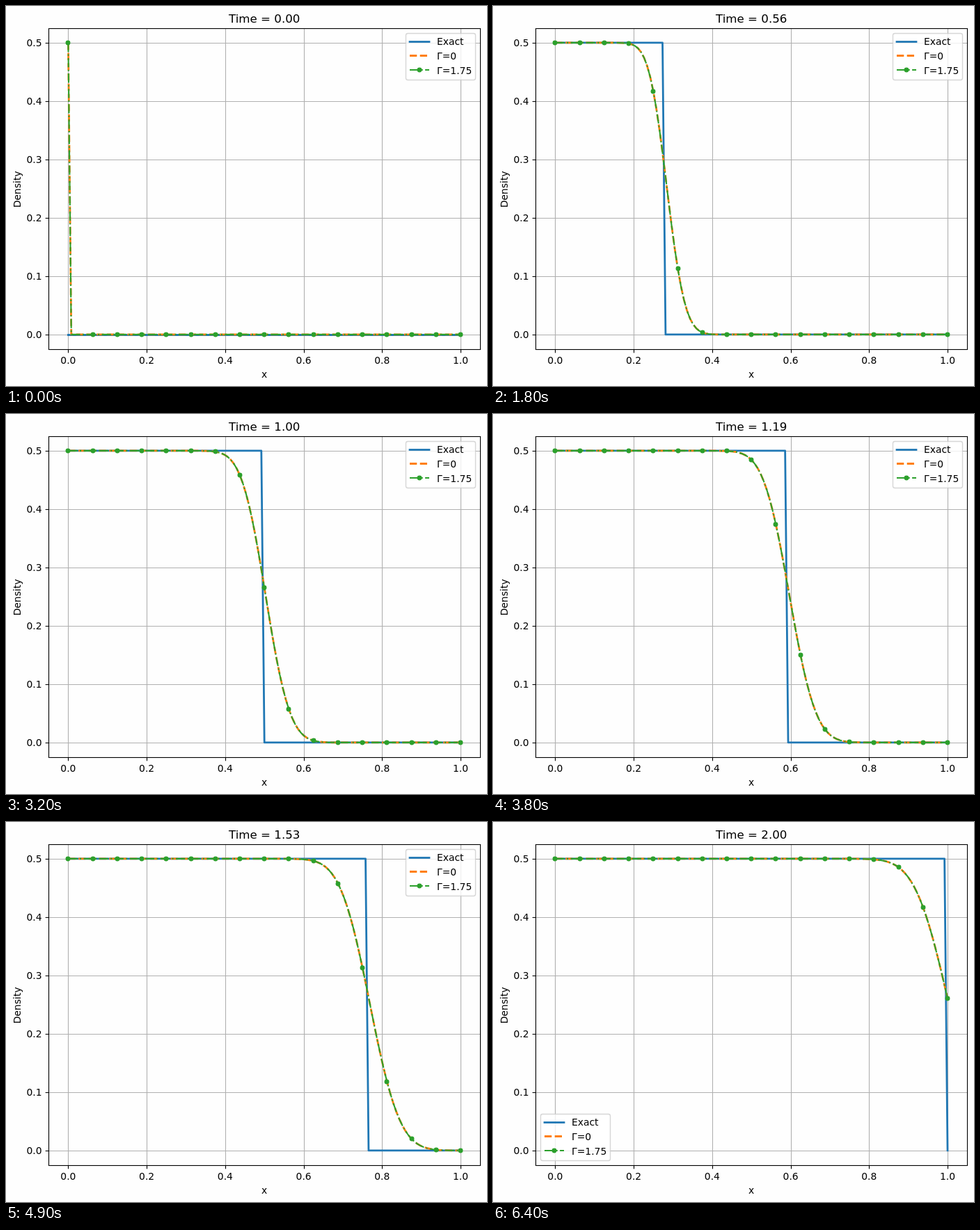
Write an HTML page with a canvas that moves like this. It is 691 by 547 pixels and loops after 6.5 s.

```html
<!DOCTYPE html>
<html lang="en">
<head>
<meta charset="utf-8">
<title>Density front</title>
<style>
html, body { margin: 0; width: 100%; height: 100%; overflow: hidden; background: #fefefe; }
canvas { display: block; width: 691px; height: 547px; }
</style>
</head>
<body>
<canvas id="stage"></canvas>
<script>
const W = 691, H = 547;
const canvas = document.getElementById('stage');
const ctx = canvas.getContext('2d');
const ratio = window.devicePixelRatio || 1;
canvas.width = Math.round(W * ratio);
canvas.height = Math.round(H * ratio);
ctx.scale(ratio, ratio);

const STEP_MS = 100, FRAMES = 65;
const CELLS = 128, COURANT = 0.4, STEPS = 5, LEVEL = 0.5;
const PT = 100 / 72;
const BOX = { l: 61.5, r: 681.5, t: 32.5, b: 494.5 };
const MID_X = 371.2, MID_Y = 263;
const BLUE = '#1f77b4', ORANGE = '#ff7f0e', GREEN = '#2ca02c';
const DASH = [3.7, 1.6].map(v => v * 2 * PT);
const DASH_DOT = [6.4, 1.6, 1, 1.6].map(v => v * 1.5 * PT);

const px = x => 89.4 + x * 620 / 1.1;
const py = y => 472.9 - y * 840;
const snap = v => Math.floor(v + 0.5);

// First-order upwind advection with a fixed inflow value.
function solve() {
  const u = new Float64Array(CELLS + 1);
  u[0] = LEVEL;
  const states = [u.slice()];
  while (states.length < FRAMES) {
    for (let s = 0; s < STEPS; s++) {
      for (let j = CELLS; j > 0; j--) u[j] -= COURANT * (u[j] - u[j - 1]);
    }
    states.push(u.slice());
  }
  return states;
}
const states = solve();

function stroke(points, color, width, dash = []) {
  ctx.beginPath();
  points.forEach(([x, y]) => ctx.lineTo(x, y));
  ctx.strokeStyle = color;
  ctx.lineWidth = width;
  ctx.lineJoin = 'round';
  ctx.lineCap = dash.length ? 'butt' : 'square';
  ctx.setLineDash(dash);
  ctx.stroke();
  ctx.setLineDash([]);
}

const solid = p => stroke(p, BLUE, 2 * PT);
const dashed = p => stroke(p, ORANGE, 2 * PT, DASH);
const dotted = p => stroke(p, GREEN, 1.5 * PT, DASH_DOT);

function marker(x, y) {
  ctx.beginPath();
  ctx.arc(snap(x), snap(y), 2.5 * PT, 0, 2 * Math.PI);
  ctx.fillStyle = GREEN;
  ctx.fill();
}

function text(str, x, y, align = 'center', size = 10) {
  ctx.font = `${size * PT}px "DejaVu Sans", sans-serif`;
  ctx.textAlign = align;
  ctx.textBaseline = 'alphabetic';
  ctx.fillStyle = '#000';
  ctx.fillText(str, x, y);
}

function axes() {
  const thin = 0.8 * PT;
  ctx.lineWidth = thin;
  for (let i = 0; i <= 5; i++) {
    const x = snap(px(i / 5)) + 0.5, y = snap(py(i / 10)) + 0.5;
    for (const [color, line] of [
      ['#b0b0b0', [x, BOX.t, x, BOX.b]],
      ['#b0b0b0', [BOX.l, y, BOX.r, y]],
      ['#000', [x, BOX.b, x, BOX.b + 4.86]],
      ['#000', [BOX.l, y, BOX.l - 4.86, y]]
    ]) {
      ctx.beginPath();
      ctx.moveTo(line[0], line[1]);
      ctx.lineTo(line[2], line[3]);
      ctx.strokeStyle = color;
      ctx.stroke();
    }
    text((i / 5).toFixed(1), px(i / 5), 515);
    text((i / 10).toFixed(1), 51.5, y + 4.5, 'right');
  }
  text('x', MID_X, 535);
  ctx.save();
  ctx.translate(21, MID_Y + 1);
  ctx.rotate(-Math.PI / 2);
  text('Density', 0, 0);
  ctx.restore();
}

function curves(k) {
  const u = states[k], exact = [], curve = [];
  const flat = k === 0;
  for (let j = 0; j <= CELLS; j++) {
    const x = px(j / CELLS);
    const y = py(j < 2 * k ? LEVEL : 0);
    exact.push([x, flat ? snap(y) + 0.5 : y]);
    curve.push([x, py(u[j])]);
  }
  solid(exact);
  dashed(curve);
  dotted(curve);
  for (let j = 0; j <= CELLS; j += 8) marker(...curve[j]);
}

function legend(x, y) {
  ctx.save();
  ctx.translate(x, y);
  ctx.beginPath();
  ctx.roundRect(0.5, 0.5, 100, 67, 2.78);
  ctx.fillStyle = 'rgba(255,255,255,0.8)';
  ctx.fill();
  ctx.strokeStyle = 'rgba(204,204,204,0.8)';
  ctx.lineWidth = PT;
  ctx.stroke();
  const row = v => [[6, v], [34, v]];
  solid(row(12.5));
  dashed(row(32.5));
  dotted(row(53));
  marker(20, 53);
  ['Exact', 'Γ=0', 'Γ=1.75'].forEach((label, i) => text(label, 45, 17 + 21 * i, 'left'));
  ctx.restore();
}

// Two decimals, ties going to the even digit.
function clock(k) {
  const t = k / 32;
  return (k % 16 === 4 ? t - 1e-6 : t).toFixed(2);
}

function draw(k) {
  ctx.fillStyle = '#fefefe';
  ctx.fillRect(0, 0, W, H);
  axes();
  curves(k);
  ctx.strokeStyle = '#000';
  ctx.lineWidth = 0.8 * PT;
  ctx.lineJoin = 'miter';
  ctx.strokeRect(BOX.l, BOX.t, BOX.r - BOX.l, BOX.b - BOX.t);
  text('Time = ' + clock(k), MID_X, 24, 'center', 12);
  if (k < 56) legend(574, 39);
  else legend(68, 420);
}

const start = performance.now();
let shown = -1;
function tick() {
  const k = Math.floor((performance.now() - start) / STEP_MS) % FRAMES;
  if (k !== shown) draw(shown = k);
  requestAnimationFrame(tick);
}
tick();
</script>
</body>
</html>
```
